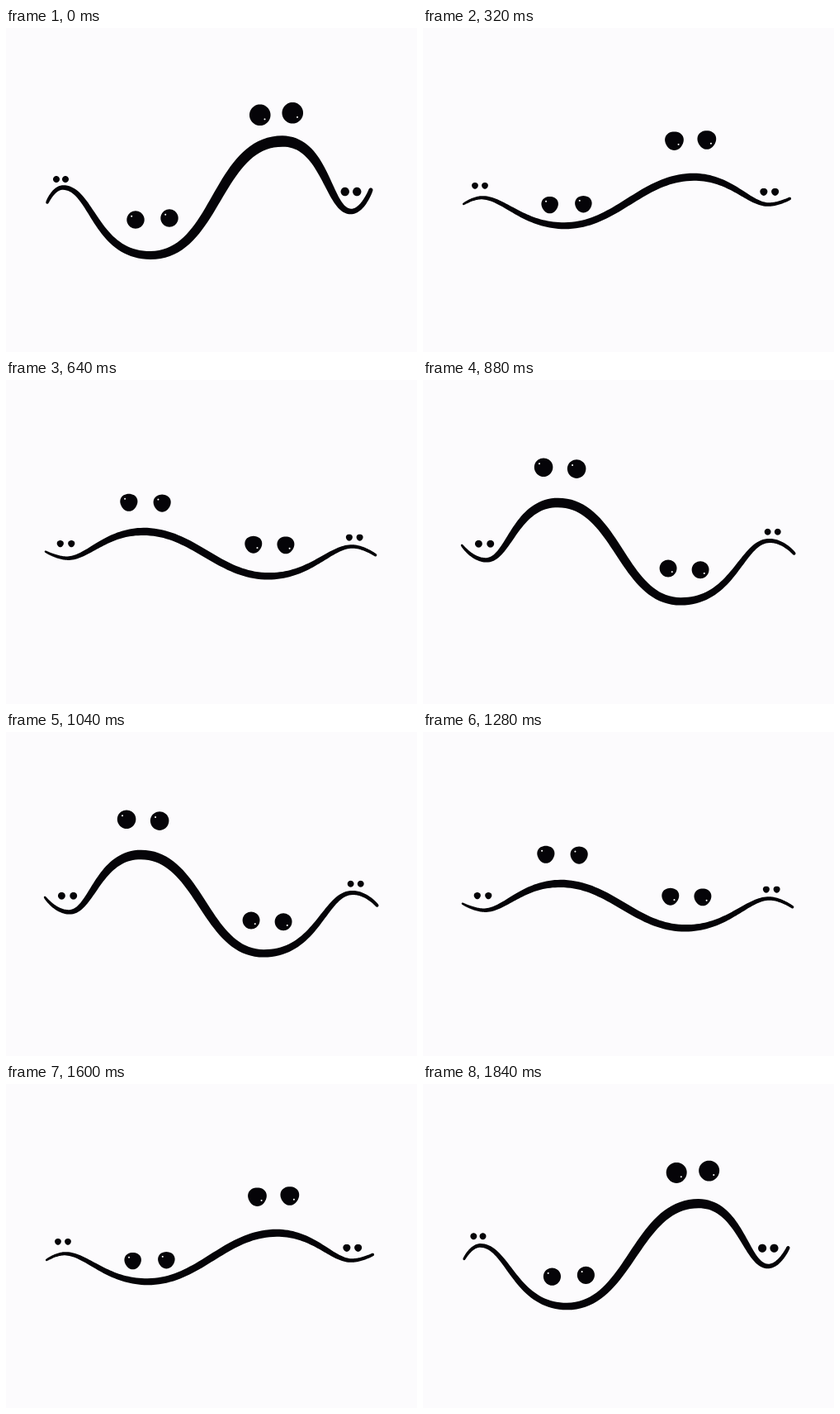
Animation of 498x392 px, one loop 1920 ms. Source, as an HTML page:

```html
<!DOCTYPE html>
<html lang="en">
<head>
<meta charset="utf-8">
<title>Wave</title>
<style>
  html, body { margin: 0; width: 100%; height: 100%; overflow: hidden; background: #fcfbfd; }
  svg { display: block; width: 498px; height: 392px; }
</style>
</head>
<body>
<svg viewBox="0 0 498 392">
  <path id="ink" fill="#050408"/>
  <path id="glints" fill="#fff"/>
</svg>
<script>
const STEP = 80, HALF = 12, SAMPLES = 40;

// Every [a, b] swings from a to b and back; dip pushes the part down mid-swing.
// The wave: its two tips and the turning points between them.
const nodes = [
  { x: [50, 47],   y: [211, 198], width: [3.5, 3],   dip: 7 },
  { x: [69, 77],   y: [193, 218], width: [5.5, 6.5], dip: 6 },
  { x: [175, 163], y: [275, 141], width: [10, 14],   dip: 4 },
  { x: [335, 311], y: [137, 274], width: [13.5, 11], dip: 4 },
  { x: [418, 420], y: [222, 193], width: [6.5, 6],   dip: 0 },
  { x: [442, 450], y: [196, 209], width: [5, 4.5],   dip: 8 }
];

// Handle lengths of the spans between nodes, as shares of the span's width
const spans = [[0, .6], [.33, .63], [.5, .5], [.63, .33], [.6, 0]];

// Pairs of eyes; tilt is how much lower the right eye sits, glint its side
const pairs = [
  { x: [66.5, 75],     y: [183, 197.5], gap: [11, 14.5], r: [4, 4.5],     tilt: [0, 0],    dip: 5,  glint: 0 },
  { x: [177.5, 165.5], y: [231, 101],   gap: [41, 40],   r: [10.7, 11.5], tilt: [-2, 2],   dip: 18, glint: -1 },
  { x: [327.5, 316],   y: [104, 231],   gap: [39.5, 39], r: [12.8, 10.5], tilt: [-2.5, 2], dip: 0,  glint: 1 },
  { x: [418, 424],     y: [198, 182.5], gap: [14.5, 12], r: [5.2, 3.9],   tilt: [0, 0],    dip: 5,  glint: 0 }
];

const lerp = (a, b, u) => a + (b - a) * u;
const polygon = points => "M" + points.map(p => p[0].toFixed(2) + " " + p[1].toFixed(2)).join("L") + "Z";

// Circle with a three-lobed bulge pointing down
function blob(x, y, r, taper = 0) {
  const points = [];
  for (let i = 0; i < 40; i++) {
    const a = i / 40 * 2 * Math.PI;
    const d = r * (1 + taper * Math.cos(3 * (a - Math.PI / 2)));
    points.push([x + d * Math.cos(a), y + d * Math.sin(a)]);
  }
  return polygon(points);
}

function bezier(a, b, c, d, t) {
  const u = 1 - t;
  return u * u * u * a + 3 * u * u * t * b + 3 * u * t * t * c + t * t * t * d;
}

// One rise or fall: flat at turning points, free at a tip
function samplePoint(a, b, [start, end], t) {
  const run = b.x - a.x;
  return {
    x: bezier(a.x, a.x + start * run, b.x - end * run, b.x, t),
    y: bezier(a.y, a.y, b.y, b.y, t),
    r: lerp(a.width, b.width, t) / 2
  };
}

function brush(line, handleScale) {
  const dots = [];
  spans.forEach((handles, i) => {
    const scaled = handles.map(h => h * handleScale);
    for (let j = i ? 1 : 0; j <= SAMPLES; j++)
      dots.push(samplePoint(line[i], line[i + 1], scaled, j / SAMPLES));
  });
  const last = dots.length - 1, upper = [], lower = [];
  dots.forEach(({ x, y, r }, i) => {
    const a = dots[Math.max(i - 1, 0)], b = dots[Math.min(i + 1, last)];
    const dx = b.x - a.x, dy = b.y - a.y, d = Math.hypot(dx, dy);
    upper.push([x + dy / d * r, y - dx / d * r]);
    lower.unshift([x - dy / d * r, y + dx / d * r]);
  });
  const cap = ({ x, y, r }) => blob(x, y, r);
  return polygon(upper.concat(lower)) + cap(dots[0]) + cap(dots[last]);
}

const ink = document.getElementById("ink"), glints = document.getElementById("glints");

function draw(ms) {
  const step = Math.floor(ms / STEP) % (2 * HALF);
  const u = 1 - Math.abs(HALF - step) / HALF;
  const cosine = (1 - Math.cos(Math.PI * u)) / 2;
  const swing = (u + cosine) / 2;
  const flat = 4 * swing * (1 - swing);
  const thin = 1 - .3 * Math.pow(flat, .4);

  const line = nodes.map(n => ({
    x: lerp(...n.x, swing),
    y: lerp(...n.y, swing) + n.dip * flat,
    width: lerp(...n.width, swing) * thin
  }));

  let inkPath = brush(line, 1 - .25 * flat), glintPath = "";
  for (const p of pairs) {
    const r = lerp(...p.r, swing) * (1 - .08 * flat);
    for (const side of [-.5, .5]) {
      const x = lerp(...p.x, swing) + side * lerp(...p.gap, swing);
      const y = lerp(...p.y, cosine) + side * lerp(...p.tilt, swing) + p.dip * flat;
      inkPath += blob(x, y, r, .04 * flat);
      if (p.glint) glintPath += blob(x + p.glint * .45 * r, y + p.glint * .4 * r, 1);
    }
  }
  ink.setAttribute("d", inkPath);
  glints.setAttribute("d", glintPath);
}

const start = performance.now();
function tick() {
  draw(performance.now() - start);
  requestAnimationFrame(tick);
}
tick();
</script>
</body>
</html>
```
